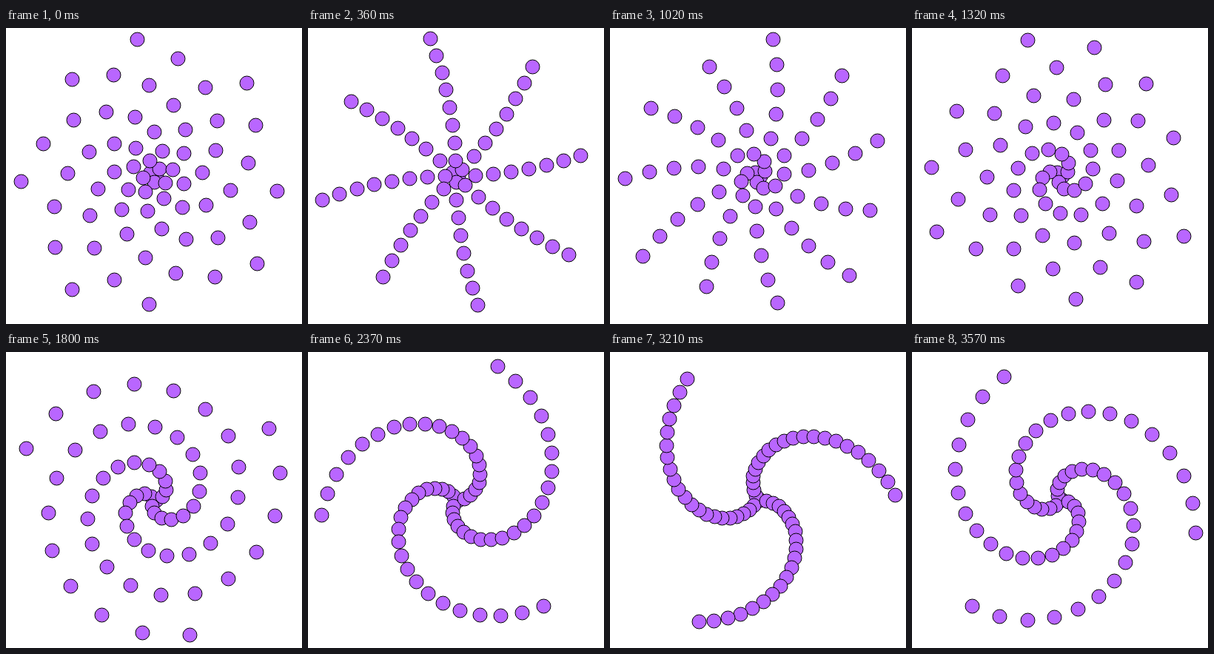
Recreate the animation shown at these times as an HTML page. Size 400x400 px, loop 3600 ms.

```html
<!DOCTYPE html>
<html lang="en">
<head>
<meta charset="utf-8">
<title>Spiral dots</title>
<style>
  html, body { margin: 0; width: 100%; height: 100%; overflow: hidden; background: #fff; }
  svg { display: block; width: 400px; height: 400px; }
  circle { fill: #b966ff; stroke: #000; stroke-width: 1; }
</style>
</head>
<body>
<svg id="stage" viewBox="0 0 400 400"></svg>
<script>
const LOOP = 3600, STEP = 30;
const COUNT = 63, SPACING = 3, CENTER = 200;
const GOLDEN = 137.508, TURN = 0.18; // degrees, degrees per step

const stage = document.getElementById('stage');
const dots = Array.from({ length: COUNT }, () => {
  const dot = document.createElementNS('http://www.w3.org/2000/svg', 'circle');
  dot.setAttribute('r', 9.5);
  return stage.appendChild(dot);
});

const snap = v => Math.floor(CENTER + v) + 0.5;

function draw(ms) {
  const step = Math.floor((ms % LOOP) / STEP);
  const angle = (GOLDEN - TURN * (step + 1)) * Math.PI / 180;
  dots.forEach((dot, i) => {
    const r = SPACING * (i + 1);
    dot.setAttribute('cx', snap(r * Math.cos(i * angle)));
    dot.setAttribute('cy', snap(-r * Math.sin(i * angle)));
  });
}

let start;
function tick(now) {
  start ??= now;
  draw(now - start);
  requestAnimationFrame(tick);
}
draw(0);
requestAnimationFrame(tick);
</script>
</body>
</html>
```
